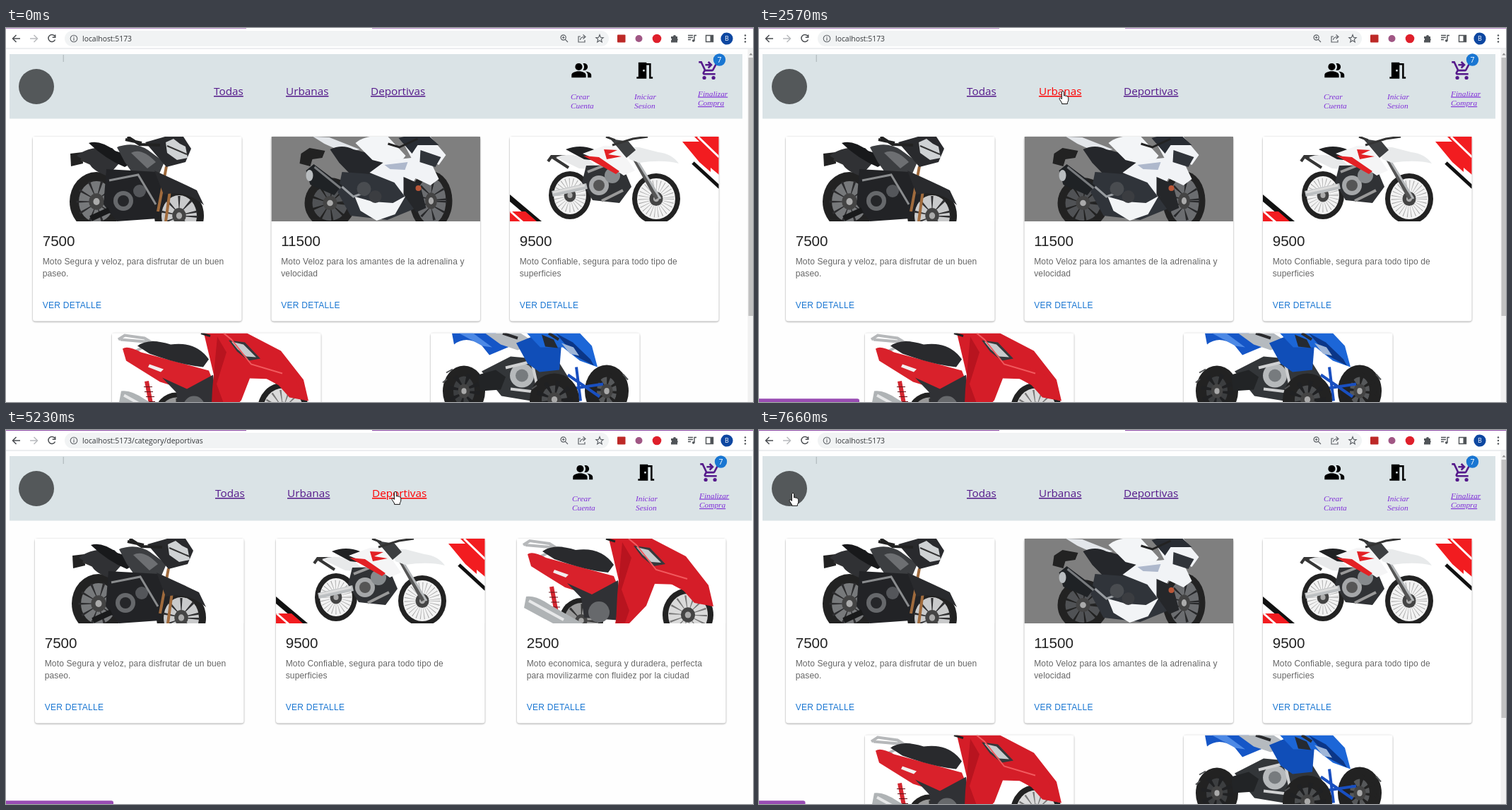
Write an HTML page that moves like this. It is 1057x530 px and loops after 8000 ms.

```html
<!DOCTYPE html>
<html lang="es">
<head>
<meta charset="utf-8">
<title>Tienda de motos</title>
<style>
html, body { margin: 0; width: 100%; height: 100%; overflow: hidden; background: #fff; }
svg { display: block; }
text { white-space: pre; }
.ui { font: 10.4px "Open Sans", "Noto Sans", sans-serif; fill: #333639; }
.link { font: 15.3px "Comic Sans MS", "Open Sans", sans-serif; fill: #551a8b; text-decoration: underline; }
.side { font: italic 11.35px "Liberation Serif", "Times New Roman", serif; fill: #8030d8; }
.price, .body, .more { font-family: "Liberation Sans", Arial, sans-serif; }
.price { font-size: 20.6px; fill: #212121; }
.body { font-size: 12.04px; letter-spacing: .0107em; fill: #666; }
.more { font-size: 12px; letter-spacing: .024em; fill: #1976d2; }
.card { filter: drop-shadow(0 1px 1px rgba(0,0,0,.28)) drop-shadow(0 0 1px rgba(0,0,0,.14)); }
</style>
</head>
<body>
<svg id="stage" width="1057" height="530" viewBox="0 0 1057 530"></svg>
<script>
const W = 295.5;
const text = (x, y, s, cls, more = '') => `<text x="${x}" y="${y}" class="${cls}" ${more}>${s}</text>`;
const rect = (x, y, w, h, fill, more = '') => `<rect x="${x}" y="${y}" width="${w}" height="${h}" fill="${fill}" ${more}/>`;
const shape = (fill, d) => `<path fill="${fill}" d="${d}"/>`;
const line = (color, width, d) => `<path fill="none" stroke="${color}" stroke-width="${width}" d="${d}"/>`;
const disc = (x, y, r, fill, ry = r) => `<ellipse cx="${x}" cy="${y}" rx="${r}" ry="${ry}" fill="${fill}"/>`;
const at = (x, y, s, scale = 1) => `<g transform="translate(${x} ${y}) scale(${scale})">${s}</g>`;

// tyre, rim and spokes; the spokes are one dashed thick stroke
function wheel(x, y, rx, ry, inner, spoke, tyre = 7, dash = '2 9') {
  const ring = (k, color, w, more) =>
    `<ellipse cx="${x}" cy="${y}" rx="${rx * k}" ry="${ry * k}" fill="none" stroke="${color}" stroke-width="${w}" ${more}/>`;
  return disc(x, y, rx, '#222', ry) + disc(x, y, rx - tyre, inner, ry - tyre) +
    ring(.45, spoke, rx * .6, `stroke-dasharray="${dash}"`) + disc(x, y, rx * .28, '#444', ry * .28) +
    disc(x, y, rx * .12, '#aaa', ry * .12);
}

const art = {
  naked: rect(0, 0, W, 120, '#fff') +
    wheel(90, 92, 38, 42, '#77797b', '#2c2c2e', 13) + wheel(207, 112, 35, 39, '#c9cacb', '#303032', 10) +
    shape('#222', 'M53 24L70 22 71 38 54 42Z') + line('#333', 4, 'M68 32L96 44') +
    shape('#303134', 'M62 27Q80 12 112 16L128 31 106 56Q84 48 80 38Z') +
    shape('#18191b', 'M79 9Q95 4 116 20L151 31 130 43Q103 32 79 9Z') +
    shape('#3c3e41', 'M119 15Q143 6 163 19L186 36 177 57 142 53 130 36Z') +
    shape('#6d6f72', 'M139 23Q154 15 174 36L162 45Z') +
    shape('#222326', 'M104 46L176 50 192 83 176 116 119 120 100 96Z') +
    disc(128, 91, 14, '#66686b') + disc(128, 91, 8, '#252629') + disc(151, 77, 9, '#54565a') +
    line('#8a8c8e', 3, 'M108 62L149 54L174 96') + line('#a06b3d', 4, 'M189 42L177 106M194 76L188 120') +
    shape('#292a2d', 'M172 48L209 65 232 76 242 97Q217 75 185 82Z') +
    shape('#292a2d', 'M159 8L187 0H213L224 17 216 36 189 43Z') +
    shape('#cfd2d4', 'M188 8L199 3 208 10 216 14 219 30 204 33 190 23Z') + line('#333', 2, 'M190 13L218 25') +
    line('#222', 4, 'M134 0L151 11L180 12M154 9L131 4') + line('#191a1b', 8, 'M108 104L82 116'),

  sport: rect(0, 0, W, 120, '#7f7f7f') +
    wheel(83, 94, 36, 36, '#505255', '#222', 11) + wheel(226, 91, 30, 42, '#6b6d70', '#28292b', 9) +
    shape('#222', 'M42 24L54 16 76 20 72 30 58 32 55 42 40 38Z') +
    shape('#e3e6ea', 'M59 0L82 1 125 18 104 23 75 10Z') +
    shape('#25272b', 'M83 18Q100 10 116 18L155 28 174 67 128 70 96 37Z') +
    shape('#30343a', 'M100 50L181 56 203 102 164 118 112 112 94 79Z') +
    shape('#f3f5f7', 'M119 9Q134 -4 165 0L190 27 178 42 143 33Z') +
    shape('#f1f3f6', 'M139 51L162 34 198 30 184 4 225 0 247 26 237 40 225 35 237 60 225 69 204 59 189 85 174 65Z') +
    shape('#282c33', 'M180 2Q198 -4 224 0L237 12 207 12 199 24Z') +
    shape('#30343a', 'M211 19L240 29 232 43 210 36Z') + shape('#aeb8cc', 'M160 40L193 36 189 47 168 46Z') +
    shape('#f2f4f6', 'M118 85L143 92 172 94 190 84 175 110 149 119 126 105Z') +
    shape('#25272a', 'M187 57L210 67 219 101 205 107 187 82Z') +
    line('#999da1', 3, 'M100 71L116 85 130 80') + disc(131, 74, 10, '#494c50') + disc(147, 85, 9, '#3b3d41') +
    shape('#1f2225', 'M49 48L60 39 100 69 89 83 55 68Z') + line('#777a7d', 3, 'M61 43L98 73') +
    disc(54, 55, 5, '#b9bdc0', 8) + disc(208, 73, 4, '#ba5637') + line('#222', 3, 'M165 10L181 15 207 3'),

  trail: rect(0, 0, W, 120, '#fff') +
    shape('#111', 'M0 82L45 120H33L0 92Z') + shape('#f21c20', 'M0 106H22L38 120H0Z') + line('#fff', 3, 'M1 106L18 121') +
    shape('#f21c20', 'M244 7H268L261 0H296V54L284 44V50L268 36Z') + line('#fff', 3, 'M266 0L296 29') +
    line('#111', 5, 'M259 37L297 72') +
    wheel(85, 83, 30, 34, '#f3f3f3', '#aaa', 7, '.7 3') + wheel(207, 88, 34, 36, '#f3f3f3', '#aaa', 7, '.7 3') +
    line('#363636', 4, 'M54 35L59 28H84M60 29L83 44') + shape('#e8e9ea', 'M65 29Q86 21 112 33L128 47 98 45Z') +
    shape('#202123', 'M79 18Q99 10 119 18L143 26 139 36 105 32Z') +
    shape('#303235', 'M108 41L159 40 172 71 155 94 117 90 102 65Z') +
    disc(126, 69, 14, '#a5a7a9') + disc(126, 69, 8, '#555') + disc(145, 55, 11, '#868a8d') +
    line('#999', 4, 'M110 50L138 39M130 91L160 76') + line('#bdc0c2', 8, 'M60 81L109 70') + line('#ddd', 3, 'M61 79L106 69') +
    shape('#f5f5f6', 'M103 24L133 13Q151 11 164 29L177 48 161 55 136 38Z') +
    shape('#e32125', 'M104 27L126 29 155 49 150 53ZM133 18L152 19 139 25 158 28 137 32Z') +
    line('#555', 5, 'M172 24L208 88') + line('#b5b8ba', 3, 'M179 32L213 88') +
    shape('#e8eaeb', 'M164 15L183 15 210 22Q229 24 239 38Q216 32 183 37L169 32Z') +
    shape('#3d3f41', 'M142 3L168 7 178 19 165 30 154 17Z') + line('#333', 3, 'M145 12L174 3L195 0M149 5L136 0'),

  moped: rect(0, 0, W, 120, '#fff') +
    wheel(91, 116, 31, 32, '#999', '#333') + wheel(242, 108, 36, 38, '#dadada', '#777', 8, '1.5 6') +
    line('#b6b8ba', 4, 'M9 9L18 3L46 7L67 20M12 9L58 13L34 25') +
    shape('#d9212b', 'M15 22Q22 17 41 27L137 53 151 88 113 83 68 69 20 39Z') +
    shape('#292a2d', 'M36 18Q52 6 83 16Q119 11 137 37L129 48Q98 45 53 29Z') +
    shape('#303135', 'M71 63L106 79 143 59 149 116 95 112 91 84Z') + disc(116, 104, 15, '#67696c') +
    shape('#d51d28', 'M130 0H191L239 25 271 66 278 96 251 91 228 65 195 64 183 95 159 120H139L148 76Z') +
    shape('#b8141f', 'M149 5L162 27 148 72 159 102 153 119 140 120 142 79Z') +
    shape('#d51d28', 'M199 54Q231 40 258 62L275 96 240 76Z') + shape('#36383b', 'M165 10L188 13 210 36 193 39 177 26Z') +
    shape('#c8ccce', 'M169 12L186 16 204 34 190 33 178 23Z') + line('#f15a5e', 2, 'M158 0L169 9L197 44L241 57') +
    line('#222', 3, 'M139 4L126 0') + line('#d32630', 6, 'M49 68L56 105') + line('#661319', 1, 'M45 76H57M46 83H58M48 90H60M50 97H61') +
    shape('#afb3b5', 'M13 82Q27 80 47 94L93 120H51L10 98Z') + line('#e7e8e9', 4, 'M17 88L66 115') +
    shape('#f2eeee', 'M53 44L73 51 69 55 51 48Z'),

  quad: rect(0, 0, W, 120, '#fff') +
    wheel(249, 82, 31, 37, '#56585a', '#222', 17, '4 8') + line('#194fc0', 4, 'M194 59L239 90M191 80L244 72M206 48L212 96') +
    shape('#333639', 'M72 54L113 33 180 39 205 79 160 99 100 89Z') +
    wheel(47, 82, 30, 36, '#3c3e40', '#202123', 15, '4 8') +
    shape('#222426', 'M67 59L92 52 106 62 99 80 70 82Z') +
    disc(129, 60, 17, '#b6b9bb') + disc(129, 60, 9, '#777b7e') + line('#d0d1d2', 4, 'M106 49L143 40L150 72M113 79L146 83') +
    shape('#1556c7', 'M30 0H92L114 18 83 31 71 16Q49 3 33 16Z') + shape('#4d89e5', 'M40 0H60L87 20 73 18Z') +
    shape('#b5babf', 'M77 0H127L149 14 123 24 99 16Z') +
    shape('#104eb8', 'M121 14L148 3 185 15 182 52 154 55 137 43Z') +
    shape('#1c66d7', 'M136 0H211L228 18 236 48 211 39 187 20 155 20Z') + shape('#0b3687', 'M177 0L201 13 226 37 231 46 204 32Z') +
    shape('#9fb6d8', 'M185 14L202 20 210 32 197 29Z') + shape('#252a32', 'M157 2L174 9 180 21 162 19Z') +
    line('#292a2d', 4, 'M102 0L123 7M167 0L181 9') +
    wheel(175, 94, 35, 37, '#4b4d4f', '#202123', 17, '4 7') +
    line('#505254', 2, 'M22 56L31 51M17 70L23 65M143 79L150 74M144 106L151 110M272 58L279 66M273 105L279 98')
};

const models = {
  naked: ['7500', 'Moto Segura y veloz, para disfrutar de un buen', 'paseo.'],
  sport: ['11500', 'Moto Veloz para los amantes de la adrenalina y', 'velocidad'],
  trail: ['9500', 'Moto Confiable, segura para todo tipo de', 'superficies'],
  moped: ['2500', 'Moto economica, segura y duradera, perfecta', 'para movilizarme con fluidez por la ciudad'],
  quad: ['10500', 'Moto Cuatriciclo, Para terrenos de montañosos,', 'ideal para espiritus aventureros']
};

function card(name, x, y = 154) {
  const [price, a, b] = models[name];
  return at(x, y, rect(0, 0, W, 261.5, '#fff', 'rx="3.5" class="card"') +
    `<svg width="${W}" height="120">${art[name]}</svg>` +
    text(13.7, 154.5, price, 'price') + text(13.7, 181, a, 'body') + text(13.7, 198.4, b, 'body') +
    text(13.7, 243, 'VER DETALLE', 'more'));
}

const pages = [
  card('naked', 38) + card('sport', 375.5) + card('trail', 713) + card('moped', 150, 432.5) + card('quad', 601, 432.5),
  card('naked', 41) + card('trail', 382) + card('moped', 723),
  card('sport', 155) + card('quad', 609.5)
];

const people = '<path d="M16.67 13.13C18.04 14.06 19 15.32 19 17v3h4v-3c0-2.18-3.57-3.47-6.33-3.87zM15 12c2.21 0 4-1.79 4-4s-1.79-4-4-4c-.47 0-.91.1-1.33.24C14.5 5.27 15 6.58 15 8s-.5 2.73-1.33 3.76c.42.14.86.24 1.33.24zM9 13c-2.67 0-8 1.34-8 4v3h16v-3c0-2.66-5.33-4-8-4z"/>' + disc(9, 8, 4, '#000');
const door = '<path d="M14 6v15H3v-2h2V3h9v1h5v15h2v2h-4V6h-3zm-4 5v2h2v-2h-2z"/>';
const cart = disc(7, 20, 2, '#551a8b') + disc(17, 20, 2, '#551a8b') +
  shape('#551a8b', 'M8.1 13h7.45c.75 0 1.41-.41 1.75-1.03L21 4.96 19.25 4l-3.7 7H8.53L4.27 2H1v2h2l3.6 7.59-1.35 2.44C4.52 15.37 5.48 17 7 17h12v-2H7l1.1-2zM12 2l4 4-4 4-1.41-1.41L12.17 7H8V5h4.17l-1.59-1.59L12 2z');

const toolbar = rect(0, 0, 1057, 29, '#fff') + rect(0, 28.5, 1057, 1, '#dcdee1') +
  rect(0, 0, 1057, 1, '#b98bc9', 'id="strip"') + rect(340, 0, 178, 1.2, '#fff') +
  rect(83, 4, 770, 22, '#f1f3f4', 'rx="11"') +
  line('#4a4d51', 1.5, 'M20 15H9.5M14.5 10L9.5 15L14.5 20M69 11.5A5 5 0 1 0 69.5 16.5M69.7 9.5V13.3H65.7') +
  line('#b9bbbe', 1.5, 'M34 15H44.5M39.5 10L44.5 15L39.5 20') +
  line('#5f6368', 1.1, 'M91.2 15A4.8 4.8 0 1 1 100.8 15A4.8 4.8 0 1 1 91.2 15M96 14V18M96 12V13.2') +
  line('#5f6368', 1.2, 'M785 13.5A3.6 3.6 0 1 1 792.2 13.5A3.6 3.6 0 1 1 785 13.5M791.2 16.2L795 20M786.8 13.5H790.4M788.6 11.7V15.3M813 12H810V20H819V17M812.5 17Q813 12.5 819 12.5M816.5 9.5L820 12.5L816.5 15.5') +
  line('#5f6368', 1.1, 'M840 9.5L841.5 13.4 845.2 13.6 842.3 16 843.3 20 840 17.7 836.7 20 837.7 16 834.8 13.6 838.5 13.4Z') +
  rect(865, 9.5, 11.5, 11, '#bd2927', 'rx="1"') + disc(895.5, 15, 5, '#a05684') + disc(921, 15, 6.3, '#df1f2b') +
  shape('#505458', 'M941 12H944A2 2 0 0 1 948 12H950V15A2 2 0 0 1 950 18V20.5H941V17.5A1.6 1.6 0 0 0 941 14.5Z') +
  line('#505458', 1.4, 'M965 10.5H972M965 13.5H972M965 16.5H969M974 18V10.5H977') + disc(972.7, 18, 1.8, '#505458') +
  line('#505458', 1.4, 'M990.5 10.5H1000.5V19.5H990.5Z') + rect(996.5, 10.5, 4, 9, '#505458') +
  disc(1020, 15, 8.6, '#0d47a1') + text(1020, 18.3, 'B', 'ui', 'text-anchor="middle" style="fill:#fff;font-size:9px"') +
  [10.5, 15, 19.5].map(y => disc(1046, y, 1.2, '#505458')).join('') +
  text(108, 18.8, '', 'ui', 'id="url"');

const nav = at(799, 44.8, people, 1.27) + at(888.5, 45, door, 1.27) + at(979, 44.5, cart, 1.3) +
  disc(1009.5, 45, 8.7, '#1976d2') + text(1009.5, 48.8, '7', 'ui', 'text-anchor="middle" style="fill:#fff;font-size:10.5px"') +
  [[294, 'Todas'], [396, 'Urbanas'], [516, 'Deportivas']].map(([x, s]) => text(x, 95, s, 'link')).join('') +
  text(799, 100.5, 'Crear', 'side') + text(799, 114, 'Cuenta', 'side') +
  text(889, 100.5, 'Iniciar', 'side') + text(889, 114, 'Sesion', 'side') +
  text(979, 96.5, 'Finalizar', 'side', 'text-decoration="underline"') +
  text(979, 110, 'Compra', 'side', 'text-decoration="underline"');

const outline = 'fill="#fff" stroke="#111" stroke-width="1" stroke-linejoin="round"';
const stage = document.getElementById('stage');
stage.innerHTML = rect(0, 0, 1057, 530, '#fefefe') + toolbar +
  rect(5, 37, 1037, 91.5, '#dae3e6', 'id="header"') + rect(80.7, 38, 1, 10, '#a9b2b5') +
  disc(43, 83, 25, '#54585a') + `<g id="nav">${nav}</g>` +
  pages.map((p, i) => `<g id="page${i}">${p}</g>`).join('') +
  `<g id="scroll">${rect(1049.5, 30, 7.5, 500, '#f1f1f1')}${rect(1050.5, 42, 6.5, 366, '#c1c1c1')}${shape('#8a8a8a', 'M1051.5 38.5L1054 35.5L1056.5 38.5Z')}</g>` +
  shape('#994cb3', '').replace('<path', '<path id="status"') +
  `<g id="cursor"><path id="arrow" ${outline} d="M0 0V13.5L3 10.7 5.2 15.6 7.3 14.7 5.1 9.9H9.2Z"/>` +
  `<path id="hand" ${outline} d="M-1.6 1.4Q0 -.8 1.6 1.4V7Q2.8 6 4 7.2Q5.5 6.6 6.3 8Q7.8 8 7.8 9.8V13Q7.6 15 6.4 16.3V18.4H-1.4V17L-4.9 11.5Q-5 9.4 -3.4 9.8L-1.6 11.4Z"/></g>`;

const el = id => document.getElementById(id);
const links = document.querySelectorAll('.link');
const show = (node, on) => node.setAttribute('display', on ? 'inline' : 'none');

// time, x and y of the pointer tip
const keys = [
  [290, 878, 465], [500, 650, 330], [720, 390, 116], [1040, 133, 249], [1240, 133, 249],
  [1400, 130, 247], [1600, 162, 214], [1740, 214, 163], [1880, 281, 115], [2020, 352, 99],
  [2090, 384, 95], [2230, 428, 93], [2440, 430, 89], [3030, 430, 90], [3100, 437, 96],
  [3240, 431, 96], [3440, 428, 95], [3580, 428, 92], [3780, 428, 92], [3850, 429, 91],
  [4120, 429, 91], [4400, 500, 94], [4680, 551, 87], [6010, 551, 87], [6080, 553, 87],
  [6360, 553, 87], [6640, 330, 86], [6850, 110, 92], [7050, 48, 89], [8000, 48, 89]
];
const TICK = 70;

function pointer(t) {
  const i = Math.max(0, keys.findIndex(k => k[0] > t) - 1);
  const [t0, x0, y0] = keys[i], [t1, x1, y1] = keys[i + 1];
  const u = Math.max(0, Math.floor((t - t0) / TICK) * TICK / (t1 - t0));
  return [x0 + (x1 - x0) * u, y0 + (y1 - y0) * u];
}

function overLink(x, y) {
  if (y < 80 || y > 102) return false;
  return x < 70 || [[294, 338], [396, 458], [516, 596]].some(([a, b]) => x >= a && x <= b);
}

const within = (t, a, b) => t >= a && t < b;

function draw(t) {
  const page = within(t, 2700, 5290) ? 1 : within(t, 5290, 7660) ? 2 : 0;
  const path = within(t, 2630, 5160) ? '/category/urbanas' : within(t, 5160, 7520) ? '/category/deportivas' : '';
  pages.forEach((_, i) => show(el('page' + i), i === page));
  show(el('scroll'), page === 0);
  el('header').setAttribute('width', page ? 1050.5 : 1037);
  el('nav').setAttribute('transform', `translate(${page ? 2 : 0} 0)`);
  el('url').textContent = 'localhost:5173' + path;
  el('strip').setAttribute('fill', t < 2700 ? '#b98bc9' : '#8e4ba8');
  links[1].style.fill = within(t, 2510, 2700) ? '#f00' : '';
  links[2].style.fill = within(t, 5100, 5290) ? '#f00' : '';

  const [x, y] = pointer(t);
  const hand = overLink(x, y);
  show(el('cursor'), t >= 290);
  show(el('hand'), hand);
  show(el('arrow'), !hand);
  el('cursor').setAttribute('transform', `translate(${x} ${y})`);

  const w = x >= 516 ? 152 : x > 345 ? 142 : 65.5;
  show(el('status'), t >= 2230);
  el('status').setAttribute('d', `M0 525.3H${w - 3}Q${w} 525.3 ${w} 528V530H0Z`);
}

function frame() {
  draw(performance.now() % 8000);
  requestAnimationFrame(frame);
}
frame();
</script>
</body>
</html>
```
